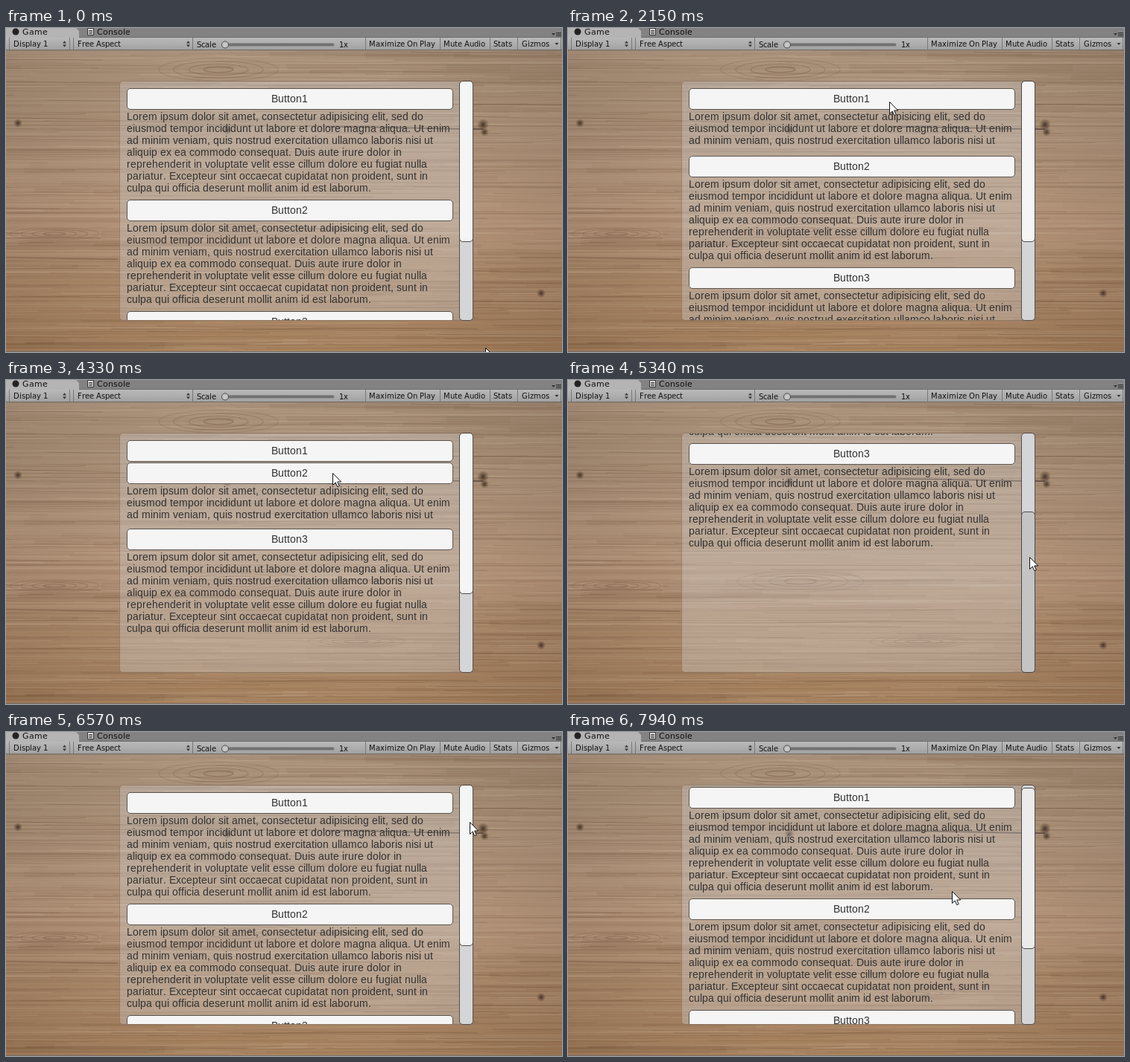
An HTML page with a canvas that plays this animation: 746x436 px, repeating every 8000 ms.

```html
<!DOCTYPE html>
<html lang="en">
<head>
<meta charset="utf-8">
<title>Accordion in a scroll view</title>
<style>
html, body { margin: 0; width: 100%; height: 100%; overflow: hidden; }
body { position: relative; background: #a88d74; }
#stage { position: absolute; left: 0; top: 0; width: 746px; height: 436px; overflow: hidden; }
#stage > *, .button, .text, #handle { position: absolute; box-sizing: border-box; }
#bar { left: 0; top: 0; }
#panel { left: 152px; top: 71px; width: 475px; height: 323px; border-radius: 5px;
  background: rgba(215, 215, 215, .33); border: 1px solid rgba(110, 90, 75, .5); }
#view { left: 153px; top: 72px; width: 455px; height: 321px; overflow: hidden; }
#view svg { display: block; overflow: visible; }
.button { left: 9px; width: 438px; height: 29px; border: 1px solid #5a544f; border-radius: 5px; background: #f5f5f5; }
.text { left: 9px; width: 446px; overflow: hidden; }
#track { left: 608px; top: 71px; width: 19px; height: 323px; border-radius: 5px;
  background: #d4d5d6; border: 1px solid #55504c; }
#handle { left: -1px; top: -1px; width: 19px; height: 217px; border-radius: 5px; border: 1px solid #4a4a4a; }
#cursor { left: 0; top: 0; overflow: visible; }
</style>
</head>
<body>
<div id="stage">
  <canvas id="wood" width="746" height="436"></canvas>
  <svg id="bar" width="746" height="30">
    <defs>
      <linearGradient id="tool" x2="0" y2="1"><stop stop-color="#b9b9b9"/><stop offset="1" stop-color="#a2a2a2"/></linearGradient>
      <path id="updown" fill="#333" d="M0 3L2.500 0L5 3ZM0 5L2.500 8L5 5Z"/>
    </defs>
    <path fill="#828282" d="M0 0H746V13H0Z"/>
    <path fill="#b4b4b4" d="M0 0H94L98 4V13H0Z"/>
    <path fill="url(#tool)" d="M0 13H746V29H0Z"/>
    <path stroke="#6c6c6c" d="M98 12.500H746M0 29.500H746"/>
    <path stroke="#777" d="M4.500 13V29M85.500 13V29M90.500 13V29M250.500 13V29M482.500 13V29M582.500 13V29M649.500 13V29M686.500 13V29M744.500 13V29"/>
    <circle cx="13" cy="5" r="4.500" fill="#222"/>
    <path fill="#ddd" stroke="#333" d="M109.500 .5H117.500V9.500H109.500Z"/>
    <path stroke="#333" d="M111 3.500H116M111 5.500H116M111 7.500H116"/>
    <use href="#updown" x="76" y="17.500"/>
    <use href="#updown" x="242" y="17.500"/>
    <path fill="#333" d="M736.500 20H741.500L739 23ZM732 7H737L734.500 10Z"/>
    <path stroke="#333" d="M738 6.500H745M738 8.500H745M738 10.500H745"/>
    <rect x="290" y="21" width="150" height="3" rx="1.500" fill="#777" stroke="#555" stroke-width=".6"/>
    <circle cx="294" cy="22.500" r="4.500" fill="#c6c6c6" stroke="#444"/>
  </svg>
  <div id="panel"></div>
  <div id="view"></div>
  <div id="track"><div id="handle"></div></div>
  <svg id="cursor" width="13" height="20">
    <path d="M.5 .5V16.500L4.200 13L6.800 18.700L9.200 17.600L6.700 12H11.700Z" fill="#fff" stroke="#111"/>
  </svg>
</div>
<script>
const LOOP = 8000, STEP = 77.25, PHASE = 910;
const OPEN = 120, FOLD = 200, LINE = 16;
const MAX_SCROLL = 176, TRAVEL = 106;
const UI = '"DejaVu Sans", sans-serif', BODY = '14px "Liberation Sans", Arial, sans-serif';
const SVG = "http://www.w3.org/2000/svg";

const $ = id => document.getElementById(id);
const clamp = (v, lo, hi) => Math.min(hi, Math.max(lo, v));
const pen = document.createElement("canvas").getContext("2d");

const LOREM = `Lorem ipsum dolor sit amet, consectetur adipisicing elit, sed do
eiusmod tempor incididunt ut labore et dolore magna aliqua. Ut enim
ad minim veniam, quis nostrud exercitation ullamco laboris nisi ut
aliquip ex ea commodo consequat. Duis aute irure dolor in
reprehenderit in voluptate velit esse cillum dolore eu fugiat nulla
pariatur. Excepteur sint occaecat cupidatat non proident, sunt in
culpa qui officia deserunt mollit anim id est laborum.`.split("\n");

// Times at which each section folds or unfolds
const CLICKS = [[870, 1570, 2048, 6345], [2590, 4210], [3255, 3820]];

// Pointer moves: start, end, and the place reached
const START = [643, 430];
const MOVES = [
  [0, 530, 440, 110], [530, 760, 431, 99], [2230, 2470, 434, 123], [2790, 3170, 437, 151],
  [3400, 3640, 439, 158], [3940, 4100, 438, 125], [4400, 4630, 487, 91], [4720, 4950, 615, 118],
  [5100, 5310, 619, 238], [5490, 5870, 622, 125], [5950, 6260, 573, 98], [6340, 6545, 622, 121],
  [6790, 7098, 612, 205], [7098, 7320, 520, 110], [7320, 7930, 515, 214]
];
const BAR_DRAGS = [{ from: 5150, to: 5950, grab: 132 }, { from: 6790, to: 7098, grab: 138 }];
const VIEW_DRAG = 7320;

// Text on whole-pixel advances, as a hinted bitmap font sets it
function addText(svg, str, x, y, font, fill) {
  pen.font = font;
  const el = document.createElementNS(SVG, "text");
  const xs = [...str].map(ch => {
    const left = x;
    x += Math.round(pen.measureText(ch).width);
    return left;
  });
  el.setAttribute("x", xs.join(" "));
  el.setAttribute("y", y);
  el.setAttribute("fill", fill);
  el.style.font = font;
  el.style.whiteSpace = "pre";
  el.textContent = str;
  svg.append(el);
}

function addBox(cls, lines, x, y) {
  const box = document.createElement("div"), svg = document.createElementNS(SVG, "svg");
  box.className = cls;
  svg.setAttribute("width", 436);
  svg.setAttribute("height", lines.length * LINE);
  lines.forEach((line, i) => addText(svg, line, x, y + i * LINE, BODY, "#323232"));
  box.append(svg);
  $("view").append(box);
  return box;
}

function buildBar() {
  const label = (str, x, y, size) => addText($("bar"), str, x, y, `${size}px ${UI}`, "#111");
  label("Game", 22, 9, 11);
  label("Console", 122, 9, 11);
  label("Display 1", 10, 25, 10);
  label("Free Aspect", 96, 25, 10);
  label("Scale", 256, 26, 10);
  label("1x", 447, 26, 10);
  label("Maximize On Play", 487, 25, 10);
  label("Mute Audio", 587, 25, 10);
  label("Stats", 654, 25, 10);
  label("Gizmos", 692, 25, 10);
}

function paintWood() {
  const c = $("wood").getContext("2d");
  let seed = 11;
  const rnd = (a = 0, b = 1) => {
    seed = (seed * 16807) % 2147483647;
    return a + (b - a) * seed / 2147483647;
  };
  const line = (x, y, x2, y2, color, width, bend = 0) => {
    const third = (x2 - x) / 3;
    c.strokeStyle = color;
    c.lineWidth = width;
    c.beginPath();
    c.moveTo(x, y);
    c.bezierCurveTo(x + third, y + bend, x2 - third, y2 - bend, x2, y2);
    c.stroke();
  };
  const dark = a => `rgba(88,58,38,${a})`, light = a => `rgba(214,194,172,${a})`;

  const base = c.createLinearGradient(0, 30, 0, 436);
  base.addColorStop(0, "#a9917a");
  base.addColorStop(.55, "#b09176");
  base.addColorStop(1, "#a8835f");
  c.fillStyle = base;
  c.fillRect(0, 29, 746, 407);

  // Planks about sixty pixels high
  for (let y = 72; y < 436; y += 59) {
    c.fillStyle = rnd() < .5 ? dark(rnd(0, .08)) : light(rnd(0, .1));
    c.fillRect(0, y, 746, 59);
    line(0, y, 746, y + 1, dark(.25), 1);
  }

  // Broad soft bands, then fine grain
  for (let i = 0; i < 1000; i++) {
    const broad = i < 80, x = rnd(-300, 700), y = rnd(30, 436), strength = rnd(.03, broad ? .09 : .2);
    line(x, y, x + rnd(120, 500), y + rnd(-2, 2), rnd() < .5 ? dark(strength) : light(strength),
      broad ? rnd(3, 9) : rnd(.5, 1.5), rnd(-4, 4));
  }

  const ovals = (x, y, w, h) => {
    for (let k = 1; k <= 4; k++) {
      c.strokeStyle = dark(.4 - k * .06);
      c.lineWidth = 1.1;
      c.beginPath();
      c.ellipse(x, y, w * k / 4, h * k / 4, 0, 0, 7);
      c.stroke();
    }
  };
  ovals(312, 271, 85, 14);
  ovals(285, 56, 80, 15);
  ovals(65, 277, 60, 8);
  ovals(470, 352, 65, 8);

  line(430, 133, 640, 136, "rgba(60,45,36,.75)", 1.6);
  line(0, 121, 430, 133, dark(.25), 1);
  line(0, 309, 150, 311, dark(.5), 1.2);

  const knot = (x, y, r) => {
    const g = c.createRadialGradient(x, y, 0, x, y, r);
    g.addColorStop(0, "rgba(50,36,28,.85)");
    g.addColorStop(1, "rgba(70,46,30,0)");
    c.fillStyle = g;
    c.fillRect(x - r, y - r, 2 * r, 2 * r);
  };
  knot(16, 128, 6);
  knot(640, 130, 8);
  knot(642, 140, 6);
  knot(718, 357, 6);
  knot(297, 137, 7);

  const edge = c.createRadialGradient(373, 230, 220, 373, 230, 470);
  edge.addColorStop(0, "rgba(60,38,24,0)");
  edge.addColorStop(1, "rgba(60,38,24,.16)");
  c.fillStyle = edge;
  c.fillRect(0, 29, 746, 407);
  c.fillStyle = "#77706a";
  c.fillRect(0, 435, 746, 1);
}

function pointer(t) {
  let [x, y] = START;
  for (const [from, to, toX, toY] of MOVES) {
    const f = clamp((t - from) / (to - from), 0, 1);
    x += (toX - x) * f;
    y += (toY - y) * f;
  }
  return [x, y];
}

// Every click reverses the fold
function sectionHeight(clicks, t) {
  return clicks.reduce((h, start, i) => {
    const f = clamp((t - start) / FOLD, 0, 1);
    return h + (i % 2 ? 1 : -1) * OPEN * f;
  }, OPEN);
}

function scrollAt(t) {
  const drag = BAR_DRAGS.findLast(d => t >= d.from);
  if (!drag) return 0;
  const y = pointer(Math.min(t, drag.to))[1];
  const byBar = clamp((y - drag.grab) * MAX_SCROLL / TRAVEL, 0, MAX_SCROLL);
  const byView = t > VIEW_DRAG ? pointer(t)[1] - pointer(VIEW_DRAG)[1] : 0;
  return byBar - byView;
}

// Pressed handle is grey and fades back after release
function handleShade(t) {
  const drag = BAR_DRAGS.findLast(d => t >= d.from);
  const fade = drag ? clamp((t - drag.to) / 230, 0, 1) : 1;
  const idle = t > VIEW_DRAG ? 235 : 245;
  return 196 + (idle - 196) * fade;
}

buildBar();
paintWood();
const sections = CLICKS.map((clicks, i) => ({
  clicks,
  text: addBox("text", LOREM, 0, 13),
  button: addBox("button", ["Button" + (i + 1)], 193, 18)
}));

function draw(now) {
  const t = Math.max(0, PHASE + Math.floor((now % LOOP - PHASE) / STEP + .01) * STEP);
  const scroll = scrollAt(t), shade = handleShade(t), [x, y] = pointer(t);
  let top = 9 - Math.round(scroll);
  for (const { clicks, text, button } of sections) {
    const h = sectionHeight(clicks, t);
    button.style.top = top + "px";
    text.style.top = top + 30 + "px";
    // Only whole lines that fit are shown
    text.style.height = Math.min(LOREM.length, Math.floor(h / LINE + .1)) * LINE + "px";
    top += 30 + Math.round(h);
  }
  $("handle").style.transform = `translateY(${Math.round(scroll * TRAVEL / MAX_SCROLL)}px)`;
  $("handle").style.background = `rgb(${shade},${shade},${shade})`;
  $("cursor").style.transform = `translate(${Math.round(x)}px,${Math.round(y)}px)`;
}

function tick() {
  draw(performance.now());
  requestAnimationFrame(tick);
}
tick();
</script>
</body>
</html>
```
